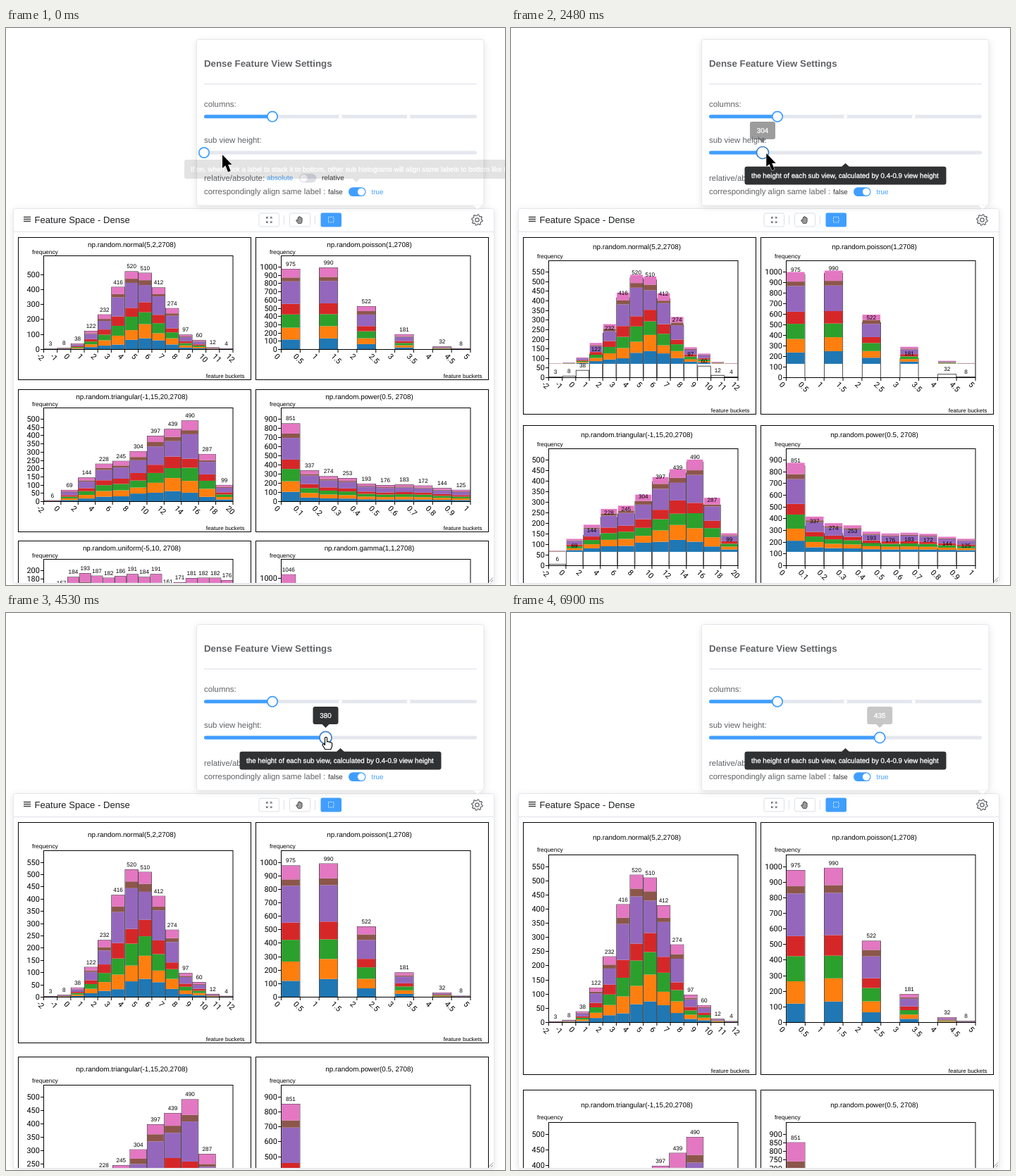
Write an HTML page that moves like this. It is 708 px wide and 791 px high and loops after 6.97 s.

```html
<!DOCTYPE html>
<html lang="en">
<head>
<meta charset="utf-8">
<title>Dense feature view</title>
<style>
  html, body { margin: 0; width: 100%; height: 100%; overflow: hidden; background: #fff; }
  svg { display: block; font-family: "Liberation Sans", Arial, sans-serif; text-rendering: geometricPrecision; }
  .card { fill: #fff; stroke: #e4e7ed; filter: drop-shadow(0 2px 5px rgba(0,0,0,.1)); }
  .label { font-size: 11.4px; fill: #606266; }
  .small { font-size: 9.85px; fill: #303133; }
  .small.on { fill: #409eff; }
  .track { fill: #e4e7ed; }
  .blue { fill: #409eff; }
  .handle { fill: #fff; stroke: #409eff; stroke-width: 1.7; }
  .button { fill: #fff; stroke: #dcdfe6; }
  .icon { fill: none; stroke: #606266; }
  .tip { fill: #303133; }
  .tip text { fill: #fff; stroke: #fff; stroke-width: .3; font-size: 9.8px; }
  #arrow { stroke: #fff; paint-order: stroke; }
  #charts .line { fill: none; stroke: #000; }
  #charts .outline { fill: #fff; stroke: #222; stroke-width: .8; }
  #charts .title { font-size: 9.87px; text-anchor: middle; }
  #charts .axis { font-family: Roboto, Arial, sans-serif; font-size: 10.9px; }
  #charts .end { text-anchor: end; }
  #charts .value { font-size: 8.2px; text-anchor: middle; }
</style>
</head>
<body>
<svg width="708" height="791" viewBox="0 0 708 791">
  <defs><clipPath id="view"><rect x="11" y="291" width="681" height="497"/></clipPath></defs>

  <rect class="card" x="10.5" y="256.5" width="682" height="532" rx="3"/>
  <path d="M11 289.5H692" stroke="#dfe2e8"/>
  <path d="M25 268.5h10M25 271.5h10M25 274.5h10" stroke="#444" stroke-width="1.5"/>
  <text x="40.5" y="277" font-size="13.1" fill="#1d1e20">Feature Space - Dense</text>
  <rect class="button" x="359" y="263" width="28.5" height="19" rx="2.5"/>
  <rect class="button" x="402.5" y="263" width="29" height="19" rx="2.5"/>
  <rect class="blue" x="446.5" y="262.5" width="29.5" height="20" rx="2.5"/>
  <path d="M394.5 266v13M438.5 266v13" stroke="#dcdfe6"/>
  <path class="icon" stroke-width=".9" d="M369.5 271v-2.5h2.5M374.5 268.5h2.5v2.5M377 274v2.5h-2.5M372 276.5h-2.5v-2.5M369.5 268.5l2.5 2.5M377 268.5l-2.5 2.5M377 276.5l-2.5-2.5M369.5 276.5l2.5-2.5"/>
  <path d="M414 277l-2.5-4 1-.8 1.5 1.3V269.5q.8-1 1.5 0V268q.8-1 1.6 0v.8q.8-.9 1.5 0v1.2q.9-.8 1.5 0V275l-1.3 2.6h-4z" fill="#999" stroke="#444" stroke-width=".9"/>
  <rect x="457.5" y="268.5" width="7.5" height="7.5" fill="none" stroke="#fff" stroke-dasharray="1.5 1.5"/>
  <path id="gear" class="icon" stroke-width="1.2" stroke-linejoin="round"/>
  <circle class="icon" cx="668.5" cy="272.5" r="2.7" stroke-width="1.2"/>

  <g id="charts" clip-path="url(#view)"></g>
  <path d="M684.5 787l6.5-6.5M688 787l3-3" stroke="#777" stroke-width=".9"/>

  <rect class="card" x="270.5" y="16.5" width="407.5" height="235.5" rx="3"/>
  <path d="M663 252l6 5 6-5z" fill="#fff"/>
  <text x="281" y="54.5" font-size="13.3" font-weight="bold" fill="#606266">Dense Feature View Settings</text>
  <path d="M281 79.5H668" stroke="#dcdfe6"/>
  <text class="label" x="281" y="112">columns:</text>
  <rect class="track" x="281" y="123.3" width="387" height="5" rx="2.5"/>
  <rect class="blue" x="281" y="123.3" width="97" height="5" rx="2.5"/>
  <circle cx="474.5" cy="125.8" r="2.5" fill="#fff"/>
  <circle cx="571.3" cy="125.8" r="2.5" fill="#fff"/>
  <circle class="handle" cx="378" cy="125.8" r="7.2"/>
  <text class="label" x="281" y="163.3">sub view height:</text>
  <rect class="track" x="281" y="174.6" width="387" height="5" rx="2.5"/>
  <rect id="fill" class="blue" x="281" y="174.6" height="5" rx="2.5"/>
  <circle id="handle" class="handle" cy="177" r="7.2"/>
  <text class="label" x="281" y="216.5">relative/absolute:</text>
  <text class="small on" x="370" y="216">absolute</text>
  <rect x="416" y="206.8" width="24.5" height="12.6" rx="6.3" fill="#dcdfe6"/>
  <circle cx="422.4" cy="213.1" r="5.2" fill="#fff"/>
  <text class="small" x="448" y="216">relative</text>
  <text class="label" x="281" y="236.3">correspondingly align same label :</text>
  <text class="small" x="457" y="236">false</text>
  <rect class="blue" x="486" y="226.2" width="24.5" height="12.8" rx="6.4"/>
  <circle cx="504.1" cy="232.6" r="5.2" fill="#fff"/>
  <text class="small on" x="518.5" y="236">true</text>

  <g id="alignTip" class="tip">
    <path d="M256 187H720V214H502l-5 5-5-5H256q-3 0-3-3V190q0-3 3-3z"/>
    <text x="262" y="204">If on, when click a label to stack it to bottom, other sub histograms will align same labels to bottom like this</text>
  </g>
  <g id="heightTip" class="tip">
    <rect x="331.5" y="196.8" width="286" height="25.8" rx="3.3"/>
    <path d="M469 197l5.5-5 5.5 5z"/>
    <text x="341" y="213.3">the height of each sub view, calculated by 0.4-0.9 view height</text>
  </g>
  <g id="bubble" class="tip">
    <path d="M-15-44H15q3 0 3 3V-22q0 3-3 3H5l-5 5-5-5H-15q-3 0-3-3V-41q0-3 3-3z"/>
    <text id="bubbleText" y="-28" text-anchor="middle"></text>
  </g>
  <path id="arrow" d="M0 0V19L4.3 15.2 8 24.5 11.7 23 8 14H13.5z"/>
  <path id="hand" d="M-1.5 1.2Q0-.8 1.5 1.2V7Q3 5.8 4 7.3 5.5 6.3 6.5 8 8.3 7.6 8.6 9.3V13.2L6.8 17.8H-1.2L-5 11.5Q-4.8 9.2-3 10L-1.5 11.5z" fill="#fff" stroke="#000" stroke-width="1.1" stroke-linejoin="round"/>
</svg>
<script>
const LOOP = 6970;
const COLORS = ['#1f77b4', '#ff7f0e', '#2ca02c', '#d62728', '#9467bd', '#8c564b', '#e377c2'];
const MIX = [13, 15, 15.7, 13, 27.6, 5, 10.7];
const $ = id => document.getElementById(id);
const clamp = x => Math.min(1, Math.max(0, x));
const ramp = (t, from, to) => clamp((t - from) / (to - from));
const lerp = (a, b, p) => a + (b - a) * p;
const easeInOut = p => p < .5 ? 4 * p ** 3 : 1 - (2 - 2 * p) ** 3 / 2;

// top: highest tick of the scale; mixes: colour shares of bars that stray from MIX
const CHARTS = [
  { title: 'np.random.normal(5,2,2708)', top: 550, step: v => v < 250 ? 100 : 50, from: -2, bin: 1,
    values: [3, 8, 38, 122, 232, 416, 520, 510, 412, 274, 97, 60, 12, 4],
    mixes: { 4: [11, 15.5, 16, 15, 24.5, 6, 12], 5: [7.8, 14.3, 15.8, 15.2, 30.4, 5.4, 11.1],
      6: [12.4, 12.4, 17.2, 11.5, 32, 5.3, 9.2], 7: [14.6, 18.5, 15.6, 13.2, 22.4, 6.4, 9.3],
      8: [14.8, 11.5, 16.3, 13.6, 29.8, 3.6, 10.4], 9: [12.2, 15, 14.5, 10, 30.3, 6, 12] } },
  { title: 'np.random.poisson(1,2708)', top: 1000, step: () => 100, from: 0, bin: .5,
    values: [975, 0, 990, 0, 522, 0, 181, 0, 32, 8],
    mixes: { 0: [12.4, 14.7, 16.5, 13.2, 28, 4.8, 10.4], 2: [13.6, 15, 14.7, 13.3, 27.4, 5, 11],
      4: [12.5, 13.5, 16.4, 12, 26.8, 8, 10.8] } },
  { title: 'np.random.triangular(-1,15,20,2708)', top: 500, step: () => 50, from: -2, bin: 2,
    values: [6, 69, 144, 228, 245, 304, 397, 439, 490, 287, 99],
    mixes: { 5: [16, 12, 14, 15, 25.5, 6.5, 11], 6: [13.5, 15.2, 15, 12.6, 28, 6.7, 9],
      7: [14.5, 18, 13.7, 16, 21.3, 6, 10.5], 8: [11, 14.6, 16.3, 11.2, 30.3, 5, 11.6],
      9: [10, 17, 17, 13.5, 26.5, 3.5, 12.5] } },
  { title: 'np.random.power(0.5, 2708)', top: 900, step: v => v > 400 ? 50 : 100, from: 0, bin: .1,
    values: [851, 337, 274, 253, 193, 176, 183, 172, 144, 125],
    mixes: { 0: [12.5, 13.6, 15.8, 12, 27.8, 5.6, 12.7] } },
  { title: 'np.random.uniform(-5,10, 2708)', top: 200, step: () => 20, from: -6, bin: 1,
    values: [0, 157, 184, 193, 187, 182, 186, 191, 184, 191, 161, 171, 181, 182, 182, 176], mixes: {} },
  { title: 'np.random.gamma(1,1,2708)', top: 1100, step: () => 200, from: 0, bin: .5,
    values: [1046, ...Array(12).fill(0)], mixes: {} },
];

// Slider settings: moment of the click, then when the value bubble shows and hides
const SETTINGS = [
  { height: 244, x: 281, at: 0, show: [0, 0], hide: [0, 0] },
  { height: 304, x: 357, at: 2340, show: [2410, 2560], hide: [2970, 3240] },
  { height: 380, x: 453.5, at: 4110, show: [4250, 4400], hide: [5060, 5330] },
  { height: 435, x: 523.2, at: 6060, show: [6210, 6400], hide: [6740, 6960] },
];

// time, x, y and shape of the pointer
const POINTER = [
  [0, 307, 180, 'arrow'], [70, 309, 181, 'arrow'], [600, 357, 183, 'arrow'], [790, 358, 180, 'hand'],
  [980, 361, 167, 'hand'], [1660, 361, 167, 'hand'], [1990, 359, 177, 'hand'], [2340, 357, 177, 'hand'],
  [2480, 362, 178, 'arrow'], [2770, 439, 180, 'arrow'], [3100, 456, 180, 'hand'], [3440, 454, 175, 'hand'],
  [3780, 454, 176, 'hand'], [5060, 454, 176, 'hand'], [5660, 524, 177, 'hand'], [6060, 524, 179, 'hand'],
  [6500, 524, 179, 'hand'], [6640, 560, 186, 'arrow'], [6830, 712, 204, 'arrow'], [LOOP, 740, 206, 'arrow'],
];

const text = (cls, x, y, str, extra = '') => `<text class="${cls}" x="${x}" y="${y}" ${extra}>${str}</text>`;
const rect = (attrs, x, y, w, h) => `<rect ${attrs} x="${x}" y="${y}" width="${w}" height="${h}"/>`;

function plotSize(height) {
  const plot = .547 * height;
  return { base: Math.round(159.3 + .654 * (height - 244)), plot: Math.round(plot), scale: plot - 16.5 };
}

function drawBars(chart, before, now, p) {
  const width = 268.5 / chart.values.length;
  const place = (size, value) => size.base - value / chart.top * size.scale;
  let boxes = '', bars = '', labels = '';
  chart.values.forEach((value, i) => {
    if (!value) return;
    const x = 36 + i * width, y = place(now, value);
    const mix = chart.mixes[i] || MIX;
    const total = mix.reduce((a, b) => a + b);
    const level = share => lerp(place(before, value * share), place(now, value * share), p);
    boxes += rect('class="outline"', x + .4, y, width - .8, now.base - y);
    let share = 0;
    mix.forEach((part, k) => {
      const bottom = level(share);
      share += part / total;
      const top = level(share);
      bars += rect(`fill="${COLORS[k]}"`, x + .7, top, width - 1.4, bottom - top);
    });
    labels += text('value', x + width / 2, y - 4.5, value);
  });
  return boxes + bars + labels;
}

function drawChart(chart, index, setting, previous, p) {
  const { height } = setting;
  const grow = height - 244;
  const now = plotSize(height), before = plotSize(previous.height);
  const cardHeight = Math.round(.817 * height + 3);
  const left = 17.5 + index % 2 * 337;
  const top = 297.5 + Math.round((index >> 1) * (.862 * height + 5.2));
  if (top > 790) return '';

  let ticks = '', labels = '';
  for (let value = 0; value <= chart.top; value += chart.step(height)) {
    const y = Math.round(now.base - value / chart.top * now.scale);
    ticks += `M36 ${y}h-4.5`;
    labels += text('axis end', 30.3, y + 3.8, value);
  }
  const bins = chart.values.length;
  for (let i = 0; i <= bins; i++) {
    const x = 36 + i * 268.5 / bins;
    ticks += `M${x} ${now.base}v4.5`;
    const name = +(chart.from + i * chart.bin).toFixed(1);
    labels += text('axis', 0, 3.5, name, `transform="translate(${x - 8} ${now.base + 8}) rotate(45)"`);
  }
  return `<g transform="translate(${left} ${top})">`
    + rect('fill="#fff" stroke="#000"', 0, 0, 330, cardHeight)
    + text('title', 161, 13.5 + .055 * grow, chart.title)
    + text('', 19.5, 23.3 + .095 * grow, 'frequency', 'font-size="8.4"')
    + text('end', 321, cardHeight - 3, 'feature buckets', 'font-size="8"')
    + rect('class="line"', 36, now.base - now.plot, 268.5, now.plot)
    + drawBars(chart, before, now, p)
    + `<path class="line" d="${ticks}M36 ${now.base}h268.5"/>` + labels + '</g>';
}

function drawGear() {
  const points = [];
  for (let i = 0; i < 32; i++) {
    const r = i % 4 < 2 ? 7.8 : 6;
    const a = (i + .5) * Math.PI / 16;
    points.push(`${668.5 + r * Math.cos(a)} ${272.5 + r * Math.sin(a)}`);
  }
  $('gear').setAttribute('d', `M${points.join('L')}Z`);
}

function drawPointer(t) {
  const i = Math.max(0, POINTER.findIndex(key => key[0] > t) - 1);
  const [t0, x0, y0, shape] = POINTER[i], [t1, x1, y1] = POINTER[i + 1];
  const p = ramp(t, t0, t1);
  for (const id of ['arrow', 'hand']) {
    $(id).style.display = id === shape ? '' : 'none';
    $(id).setAttribute('transform', `translate(${lerp(x0, x1, p)} ${lerp(y0, y1, p)})`);
  }
}

let drawn = '';
function render(t) {
  const index = SETTINGS.findLastIndex(s => t >= s.at);
  const setting = SETTINGS[index], previous = SETTINGS[Math.max(0, index - 1)];
  const p = index ? easeInOut(ramp(t, setting.at, setting.at + 280)) : 1;
  const key = `${index}:${p}`;
  if (key !== drawn) {
    $('charts').innerHTML = CHARTS.map((chart, i) => drawChart(chart, i, setting, previous, p)).join('');
    drawn = key;
  }

  const { x, show, hide } = setting;
  const active = index ? 1 - ramp(t, ...hide) : 0;
  $('fill').setAttribute('width', x - 281);
  $('handle').setAttribute('cx', x);
  $('handle').setAttribute('r', 7.2 + 1.4 * active * ramp(t, setting.at, setting.at + 150));
  $('handle').style.stroke = active > .5 ? '#3a7fc4' : '';
  $('bubble').setAttribute('transform', `translate(${x} 177)`);
  $('bubble').style.opacity = index ? Math.min(ramp(t, ...show), active) : 0;
  $('bubbleText').textContent = setting.height;

  $('alignTip').style.opacity = .13 * (1 - ramp(t, 20, 130));
  $('heightTip').style.opacity = ramp(t, 380, 640);
  drawPointer(t);
}

drawGear();
const start = performance.now();
function tick() {
  render((performance.now() - start) % LOOP);
  requestAnimationFrame(tick);
}
tick();
</script>
</body>
</html>
```
